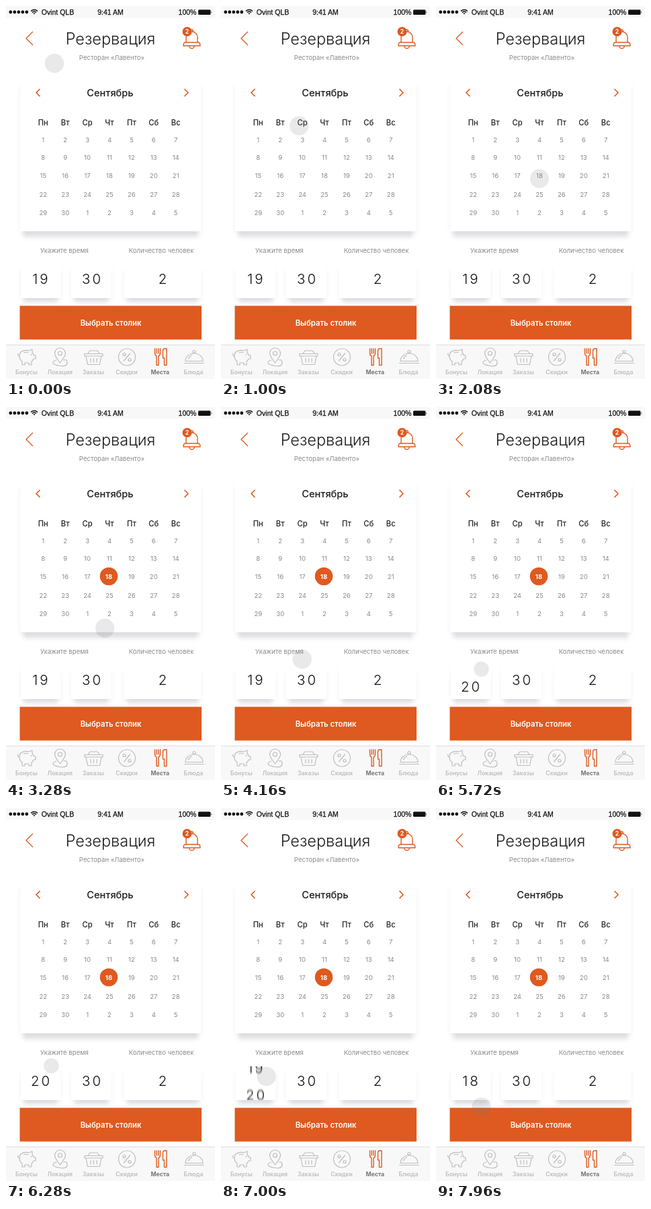
An HTML page for the animation above (8000 ms loop, 311 by 553 pixels).

```html
<!DOCTYPE html>
<html lang="ru">
<head>
<meta charset="utf-8">
<style>
  html, body { margin: 0; width: 100%; height: 100%; overflow: hidden; background: #fff; }
  svg { display: block; width: 311px; height: 553px; }
  text { font-family: Inter, "Open Sans", sans-serif; text-anchor: middle; fill: #8b8b8b; font-size: 9.6px; }
  .status text { font-family: "Liberation Sans", sans-serif; font-size: 10.5px; fill: #111; stroke: #111; stroke-width: .25; }
  .title { font-size: 23.5px; font-weight: 300; fill: #1c1c1c; }
  .month { font-size: 14.6px; font-weight: 500; fill: #1c1c1c; }
  .weekday { font-size: 11.2px; font-weight: 500; fill: #222; }
  .digits { font-size: 20.5px; font-weight: 300; fill: #111; letter-spacing: 3px; }
  .button { font-size: 11.3px; font-weight: 600; fill: #fff; }
  .white { font-weight: 700; fill: #fff; }
  .tab { font-size: 8.7px; font-weight: 600; fill: #bdbdbd; }
  .line { fill: none; stroke-width: 1.4; stroke-linecap: round; stroke-linejoin: round; }
  .orange { stroke: #de5a20; }
  .grey { stroke: #bdbdbd; stroke-width: 1.2; }
</style>
</head>
<body>
<svg viewBox="0 0 311 553">
  <defs>
    <filter id="soft" x="-10%" y="-50%" width="120%" height="200%"><feGaussianBlur stdDeviation="3"/></filter>
    <filter id="motion" filterUnits="userSpaceOnUse" x="22" y="340" width="60" height="140">
      <feGaussianBlur id="blur" stdDeviation="0 0"/>
    </filter>
    <clipPath id="hourClip"><rect x="22" y="383" width="60" height="50"/></clipPath>
  </defs>
  <rect width="311" height="553" fill="#fff"/>

  <g class="status">
    <rect width="311" height="17.5" fill="#f8f8f8"/>
    <g id="signal"></g>
    <g class="line" stroke="#111" style="stroke-linecap:butt">
      <path d="M37 7.6Q42 3.2 47 7.6M38.9 9.6Q42 7 45.1 9.6"/>
      <path d="M40.4 10.8Q42 9.5 43.6 10.8L42 12.5Z" fill="#111" stroke="none"/>
    </g>
    <text x="77" y="13">Ovint QLB</text>
    <text x="155.5" y="13">9:41 AM</text>
    <text x="270" y="12.5">100%</text>
    <rect x="286" y="5.5" width="18.5" height="7.5" rx="1.5" fill="#111"/>
    <path d="M305.5 7.7q1.8 1.5 0 3z" fill="#111"/>
  </g>

  <path class="line orange" d="M39.5 38.5L30 48L39.5 57.5"/>
  <text class="title" x="155.5" y="56.5">Резервация</text>
  <text x="157.5" y="79.5">Ресторан «Лавенто»</text>
  <path class="line orange" d="M268 54V46.5A8.5 8.5 0 0 1 285 46.5V54M266.5 54H286.5Q289 54.500 289 59H264Q264 54.500 266.500 54ZM272.500 59Q273 62.800 276.500 62.800T280.500 59M274.500 38Q274.500 35 276.500 35T278.500 38"/>
  <circle cx="269.5" cy="38" r="7" fill="#de5a20"/>
  <text class="white" x="269.5" y="41" style="font-size:8.5px">2</text>

  <g id="cards"></g>
  <path class="line orange" style="stroke-width:1.7" d="M50 123.5L45 128.5L50 133.5M266 123.5L271 128.5L266 133.5"/>
  <text class="month" x="155" y="134">Сентябрь</text>
  <g id="calendar"></g>
  <g id="selected">
    <circle cx="153" cy="251" r="13.3" fill="#de5a20"/>
    <text class="white" x="153" y="254.7">18</text>
  </g>

  <text x="87" y="366">Укажите время</text>
  <text x="231" y="366">Количество человек</text>
  <g clip-path="url(#hourClip)"><g id="hours"></g></g>
  <text class="digits" x="128.5" y="412">30</text>
  <text class="digits" x="234.5" y="412">2</text>

  <rect x="20.5" y="444.5" width="270.5" height="50" fill="#de5a20"/>
  <text class="button" x="156" y="474">Выбрать столик</text>

  <rect y="502" width="311" height="51" fill="#f8f8f8"/>
  <rect y="502" width="311" height="1" fill="#dedede"/>
  <g class="line grey">
    <path d="M22 513Q27 509 34 511L39 509L39 514Q41 516 41.5 518H44V523H41Q40 526 38 527V532H34V529H28V532H24V527Q20 524 20 519Q20 515 22 513ZM20 519Q17 519 18 515M27 514Q30 512.5 33 514"/>
    <circle cx="37.5" cy="517" r=".4"/>
    <path d="M80.5 529C76 523 72.5 519 72.5 515A8 8 0 0 1 88.5 515C88.5 519 85 523 80.5 529ZM75 525Q70 526 70 529T80.5 533.5T91 529T86 525"/>
    <circle cx="80.5" cy="515" r="3"/>
    <path d="M117 515.5H144V519H117ZM119 519L121.500 531.500H139.500L142 519M122 515L125 511H136L139 515M126 522.500V528M130.500 522.500V528M135 522.500V528"/>
    <circle cx="180" cy="520.5" r="12.5"/>
    <path d="M184.5 515L175.5 526"/>
    <circle cx="176" cy="516.5" r="2"/><circle cx="184" cy="524.5" r="2"/>
    <path d="M267 526.5A13 11.500 0 0 1 293 526.500ZM265.500 529.500H294.500M271.500 523Q273 519 276.500 518"/>
    <circle cx="280" cy="512.5" r="2"/>
  </g>
  <path class="line orange" d="M221.5 508V514Q221.500 518 224 519V532.500H227V519Q229.500 518 229.500 514V508M224.200 508V515M226.800 508V515M233.500 522V511Q233.500 508 236.500 508H239V532.500H235.500V522Z"/>
  <g id="tabs"></g>

  <circle id="touch" fill="#787878" fill-opacity=".165"/>
</svg>
<script>
const $ = id => document.getElementById(id);
const LOOP = 8000, HOUR_STEP = 40;

function add(parent, tag, attrs, label = '') {
  const node = document.createElementNS('http://www.w3.org/2000/svg', tag);
  for (const key in attrs) node.setAttribute(key, attrs[key]);
  node.textContent = label;
  return $(parent).appendChild(node);
}

function card(x, y, width, height, depth) {
  add('cards', 'rect', { x, y: y + 7, width, height: height - 4, fill: '#9a9aa8', opacity: .13, filter: 'url(#soft)' });
  add('cards', 'rect', { x: x + 5, y: y + height - 12, width: width - 10, height: 12 + depth, fill: '#a6a6b0', opacity: .3, filter: 'url(#soft)' });
  add('cards', 'rect', { x, y, width, height, fill: '#fff' });
}
card(21, 110, 269.5, 224, 9);
card(22, 384, 59.5, 49, 6);
card(97, 384, 60, 49, 6);
card(175.5, 384, 115, 49, 6);

for (let i = 0; i < 5; i++) add('signal', 'circle', { cx: 6.8 + i * 6, cy: 9, r: 2.4, fill: '#111' });

const columnX = i => 55.3 + i * 32.9;
['Пн', 'Вт', 'Ср', 'Чт', 'Пт', 'Сб', 'Вс'].forEach((name, i) =>
  add('calendar', 'text', { class: 'weekday', x: columnX(i), y: 177 }, name));
[198, 224.5, 251, 279.5, 306].forEach((y, row) => {
  for (let i = 0; i < 7; i++)
    add('calendar', 'text', { x: columnX(i), y: y + 3.7 }, (row * 7 + i) % 30 + 1);
});

['Бонусы', 'Локация', 'Заказы', 'Скидки', 'Места', 'Блюда'].forEach((name, i) =>
  add('tabs', 'text', { class: 'tab', x: 30.5 + i * 49.7, y: 546, style: i === 4 ? 'fill:#777;font-weight:700' : '' }, name));

[18, 19, 20].forEach((hour, i) =>
  add('hours', 'text', { class: 'digits', x: 52.5, y: 412 + (i - 1) * HOUR_STEP }, hour));

const progress = (t, from, to) => Math.min(1, Math.max(0, (t - from) / (to - from)));
const smooth = (t, from, to) => { const p = progress(t, from, to); return p * p * (3 - 2 * p); };

// Cubic Bezier (.25, .1, .25, 1): quick start, long settling.
function settle(t, from, to) {
  const p = progress(t, from, to);
  let low = 0, high = 1;
  for (let i = 0; i < 24; i++) {
    const u = (low + high) / 2;
    if (.75 * u * (1 - u) + u ** 3 < p) low = u; else high = u;
  }
  return .3 * low * (1 - low) ** 2 + 3 * low * low * (1 - low) + low ** 3;
}

// Drag: small pull down, swipe up, then a long swipe down.
const drag = (t, up, down) =>
  9 * smooth(t, 4720, 5100) - (9 + up) * settle(t, 5100, 6380) + down * settle(t, 6785, 7960);
const hourShift = t => drag(t, HOUR_STEP, 2 * HOUR_STEP);

function draw(t) {
  const toDay = smooth(t, 600, 1360), away = smooth(t, 2880, 3520), toHour = smooth(t, 4000, 4440);
  const press = smooth(t, 2040, 2360) - smooth(t, 2400, 2720) + smooth(t, 4720, 5320) - smooth(t, 6800, 7000);
  $('touch').setAttribute('cx', 72 + 82 * toDay - 10 * away - 76.5 * toHour);
  $('touch').setAttribute('cy', 85 + 171 * toDay + 105 * away + 43 * toHour + drag(t, 22, 61.5));
  $('touch').setAttribute('r', 14.2 - 3 * press);

  const pop = progress(t, 2320, 2680);
  const scale = 1 + 2.2 * (pop - 1) ** 3 + 1.2 * (pop - 1) ** 2;
  $('selected').setAttribute('transform', `translate(153 251) scale(${Math.max(0, scale)}) translate(-153 -251)`);
  $('selected').setAttribute('visibility', pop > 0 ? 'visible' : 'hidden');

  const smear = Math.abs(hourShift(t + 20) - hourShift(t - 20)) / Math.sqrt(12);
  $('hours').setAttribute('transform', `translate(0 ${hourShift(t)})`);
  $('blur').setAttribute('stdDeviation', `0 ${smear}`);
  if (smear > .1) $('hours').setAttribute('filter', 'url(#motion)');
  else $('hours').removeAttribute('filter');
}

function frame() {
  draw(performance.now() % LOOP);
  requestAnimationFrame(frame);
}
frame();
</script>
</body>
</html>
```
